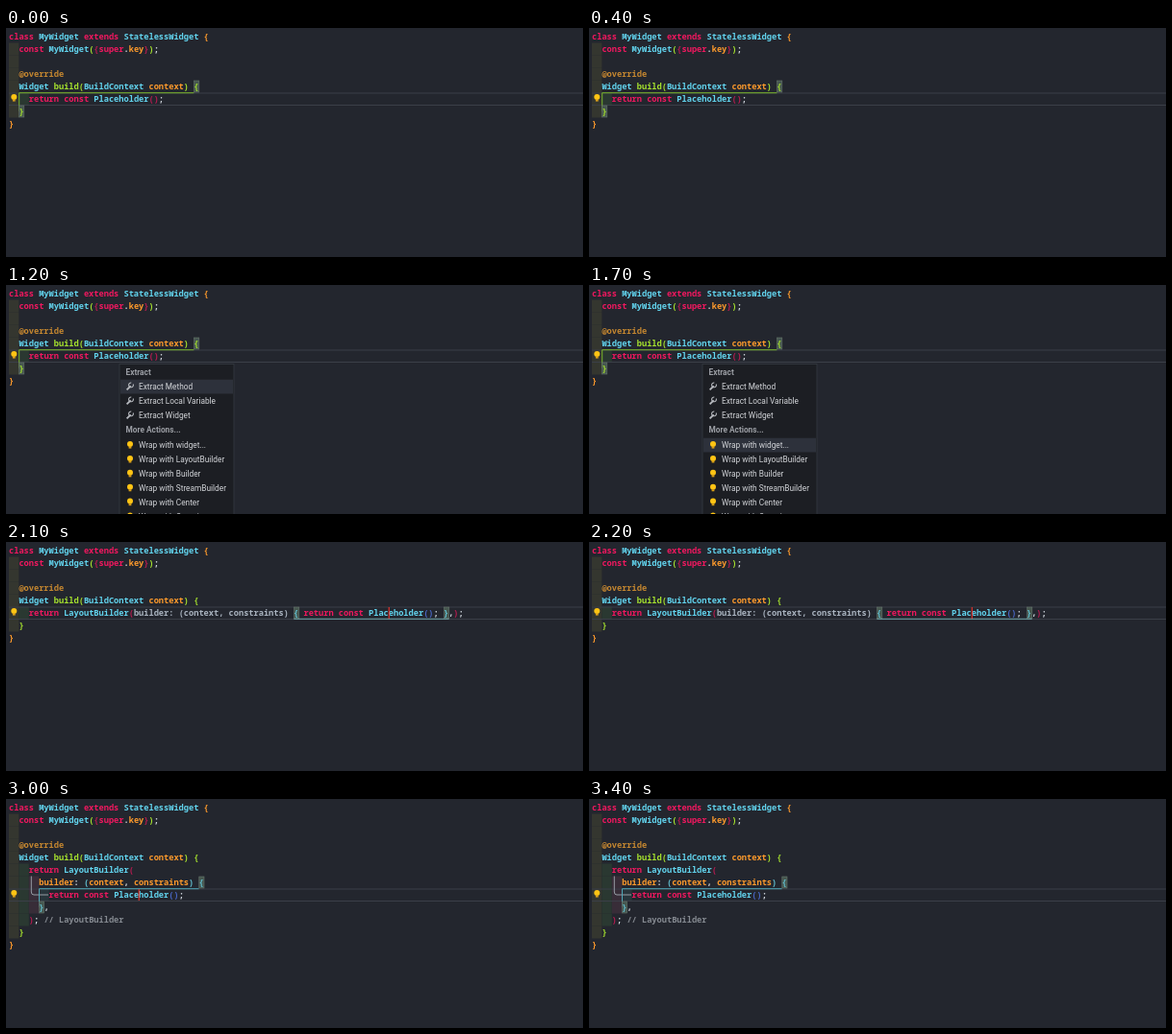
Animation, 600 px wide and 239 px high, one loop 3.5 s. Source, as an HTML page:

```html
<!DOCTYPE html>
<html lang="en">
<head>
<meta charset="utf-8">
<style>
html, body { margin: 0; width: 600px; height: 239px; overflow: hidden; background: #23262e; }
svg { display: block; }
text { white-space: pre; }
.code { font: 600 8.667px "Noto Sans Mono", "DejaVu Sans Mono", monospace; font-variant-ligatures: none; }
.menu { font: 8.3px Roboto, "Open Sans", sans-serif; }
</style>
</head>
<body>
<svg id="stage" width="600" height="239" viewBox="0 0 600 239"></svg>
<script>
const stage = document.getElementById('stage');
const LOOP = 3500, TICK = 100;
const CHAR = 5.2, LINE = 13, LEFT = 3;
const colors = {
  k: '#f0185f', t: '#62d4ee', v: '#fd9a2c', a: '#c58730', g: '#a6e22e',
  w: '#d5dbe2', n: '#aab4c0', p: '#b51c50', c: '#62bfd0', b: '#4866c4', m: '#858a91'
};
const indentTints = ['#34362f', '#2a3831', '#382d38', '#28363c'];

// Each token is a color key followed by its text; tokens are separated by "|".
const head = [
  [0, 'kclass |tMyWidget |kextends |tStatelessWidget |v{'],
  [2, 'kconst |tMyWidget|g(|p{|ksuper|w.|vkey|p}|g)|w;'],
  [2, ''],
  [2, 'a@override'],
  [2, 'tWidget |gbuild(|tBuildContext |vcontext|g) {']
];
const tail = [[2, 'g}'], [0, 'v}']];
const inner = 'kreturn const |tPlaceholder';
const plain = [...head, [4, inner + '|p()|w;'], ...tail];
const wrapped = [...head,
  [4, 'kreturn |tLayoutBuilder|p(|nbuilder: (context, constraints) |c{ |' + inner + '|b()|w; |c}|w,|p)|w;'],
  ...tail];
const formatted = comment => [...head,
  [4, 'kreturn |tLayoutBuilder|p('],
  [6, 'vbuilder|w: |c(|vcontext|w, |vconstraints|c) {'],
  [8, inner + '|b()|w;'],
  [6, 'c}|w,'],
  [4, 'p)|w;' + (comment ? '|m // LayoutBuilder' : '')],
  ...tail];

const colX = col => LEFT + col * CHAR;
const rowY = row => 2.5 + row * LINE;
const rect = (x, y, w, h, fill, extra = '') =>
  `<rect x="${x}" y="${y}" width="${w}" height="${h}" fill="${fill}" ${extra}/>`;
const path = (d, stroke, width = 1) =>
  `<path d="${d}" fill="none" stroke="${stroke}" stroke-width="${width}"/>`;
const label = (x, y, body, fill, extra = '') =>
  `<text x="${x}" y="${y}" fill="${fill}" ${extra}>${body}</text>`;

function codeLine([indent, source], row) {
  const spans = source.split('|').filter(Boolean)
    .map(s => `<tspan fill="${colors[s[0]]}">${s.slice(1)}</tspan>`).join('');
  return label(colX(indent), rowY(row) + 9.4, spans, colors.w, 'class="code"');
}

function indents(lines) {
  return lines.map(([indent], row) => {
    let out = '';
    for (let i = 0; i < indent / 2; i++)
      out += rect(colX(i * 2), rowY(row), CHAR * 2, LINE, indentTints[i]);
    return out;
  }).join('');
}

const bracketBox = (col, row) =>
  rect(colX(col) + .2, rowY(row) + .5, CHAR, LINE - 1, '#46574f', 'stroke="#66756c" stroke-width=".6"');

const caret = (col, row) => rect(colX(col) - .5, rowY(row) + .5, 1.1, LINE - 1, '#f0342b');

const currentLine = row =>
  path(`M${LEFT} ${rowY(row) + .5}H600M${LEFT} ${rowY(row) + LINE}H600`, '#3b3f48');

function scope(col, row, endCol, color) {
  const x = colX(col) + .3, y = rowY(row) + .2;
  return path(`M${colX(endCol)} ${y}H${x}V${y + LINE + 6}`, color);
}

const bulb = (x, y, r = 3) =>
  `<circle cx="${x}" cy="${y}" r="${r}" fill="#ffc414"/>` +
  rect(x - 1.4, y + r - .4, 2.8, 2, '#d99f18');

const wrench = (x, y) =>
  path(`M${x - 3.4} ${y + 3.4}L${x + .7} ${y - .7}`, '#b8bbc0', 1.8) +
  path(`M${x + 3.2} ${y - 2.6}A2.4 2.4 0 1 1 ${x + 1.3} ${y - 4}`, '#b8bbc0', 1.1);

function menu(selected) {
  const items = ['Extract Method', 'Extract Local Variable', 'Extract Widget',
    ...['widget...', 'LayoutBuilder', 'Builder', 'StreamBuilder', 'Center', 'Container'].map(s => 'Wrap with ' + s)];
  const title = (y, s) => label(124.5, y, s, '#9b9ea4', 'font-weight="700"');
  const rows = items.map((item, i) => {
    const y = i < 3 ? 106 + i * 15 : 167 + (i - 3) * 14.9;
    return (i === selected ? rect(119, y - 7.3, 117, 14.8, '#2d313b') : '') +
      (i < 3 ? wrench(129, y) : bulb(129, y - 1)) +
      label(138, y + 3, item, '#d2d4d8');
  }).join('');
  return '<g class="menu">' +
    rect(118, 82.5, 119, 170, '#1c1e23', 'stroke="#363a41" stroke-width=".8"') +
    title(93.7, 'Extract') + title(154.4, 'More Actions...') + rows + '</g>';
}

const text = lines => lines.map(codeLine).join('');

function beforeWrap(t) {
  let out = indents(plain) + currentLine(5) + scope(2, 5, 37, '#79b62c') +
    bracketBox(37, 4) + bracketBox(2, 6) + text(plain) + bulb(8.3, 72);
  if (t >= 500 && t < 1000) out += caret(22, 5);
  if (t >= 1000) {
    const selected = t < 1400 ? 0 : t < 1500 ? 1 : t < 1600 ? 2 : t < 1800 ? 3 : 4;
    out += menu(selected);
  }
  return out;
}

function afterWrap() {
  return indents(wrapped) + currentLine(5) + bracketBox(57, 5) + bracketBox(87, 5) +
    path(`M${colX(57)} 80.3H${colX(88)}`, '#6fa3a8') +
    text(wrapped) + caret(76, 5) + bulb(8.3, 72);
}

function afterFormat(t) {
  const settling = t < 2700;
  const lines = formatted(t >= 2800);
  let out = indents(lines) + currentLine(7);
  if (settling) {
    out += rect(LEFT, rowY(7) + .5, 36, LINE - 1, '#474d57') + rect(402, 68, 3.4, 12, '#7d1820');
    for (let row = 5; row < 10; row++)
      for (let col = 0; col < lines[row][0]; col++)
        out += rect(colX(col) + 2.2, rowY(row) + 6.2, .8, .8, '#555b65');
  }
  out += path('M26.3 80.5V97Q26.3 100 29 100H44', '#969ca4') +
    scope(6, 7, 38, '#50a6b5') + bracketBox(38, 6) + bracketBox(6, 8) + text(lines) +
    bulb(8.3, settling ? 72 : 98);
  if (!settling && t < 3100) out += caret(26, 7);
  return out;
}

let shown = -1;
function draw(now) {
  const t = Math.floor(now % LOOP / TICK) * TICK;
  if (t !== shown) {
    shown = t;
    stage.innerHTML = rect(0, 0, 600, 239, '#23262e') +
      (t < 2000 ? beforeWrap(t) : t < 2600 ? afterWrap() : afterFormat(t));
  }
}

const start = performance.now();
function loop() {
  draw(performance.now() - start);
  requestAnimationFrame(loop);
}
loop();
</script>
</body>
</html>
```
